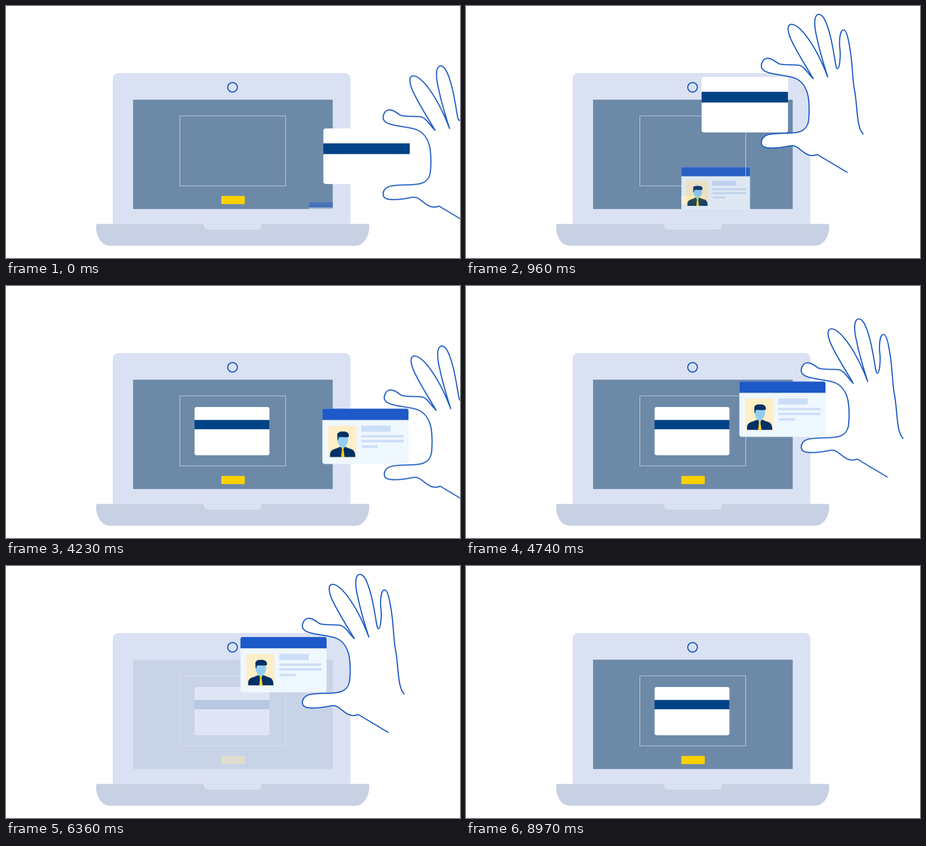
An HTML page without scripts that plays this animation: 1004x558 px, repeating every 9 s.

```html
<!DOCTYPE html>
<html lang="en">
<head>
<meta charset="utf-8">
<title>Card capture</title>
<style>
  html, body { margin: 0; width: 100%; height: 100%; overflow: hidden; background: #fff; }
  svg { display: block; width: 100%; height: 100%; }

  .hand { fill: #fff; stroke: #1f5cc6; stroke-width: 2.6; stroke-linecap: round; stroke-linejoin: round; }

  .first, .second, .stored { animation: 9s step-end infinite; }
  .first { animation-name: show-first; }
  .second { animation-name: show-second; }
  .stored { animation-name: show-stored; }
  @keyframes show-first {
    0% { visibility: visible; }
    44.2%, 100% { visibility: hidden; }
  }
  @keyframes show-second {
    0% { visibility: hidden; }
    46.84% { visibility: visible; }
    99.5%, 100% { visibility: hidden; }
  }
  @keyframes show-stored {
    0% { visibility: hidden; }
    46.84%, 100% { visibility: visible; }
  }

  /* the hand brings each card up to the camera */
  .reach-first { animation: reach-first 9s linear infinite; }
  .reach-second { animation: reach-second 9s linear infinite; }
  @keyframes reach-first {
    0% { transform: translate(181px, 114.3px); }
    10.667%, 100% { transform: translate(0, 0); }
  }
  @keyframes reach-second {
    0%, 47% { transform: translate(181.3px, 114.5px); }
    57.8%, 100% { transform: translate(0, 0); }
  }

  /* the camera view follows on a curve: x slows down, y speeds up */
  .view-x { animation: view-x 9s cubic-bezier(.33, .5, .67, .9) infinite; }
  .view-y { animation: view-y 9s cubic-bezier(.33, .05, .67, .36) infinite; }
  .view-size { animation: view-size 9s cubic-bezier(.33, 1, .67, 1) infinite; }
  .view-fade { animation: view-fade 9s cubic-bezier(.33, .5, .67, .9) infinite; }
  @keyframes view-x {
    0% { transform: translateX(713.5px); }
    17.333%, 100% { transform: translateX(502px); }
  }
  @keyframes view-y {
    0% { transform: translateY(463px); }
    17.333%, 100% { transform: translateY(321.7px); }
  }
  @keyframes view-size {
    0% { transform: scale(.46); }
    17.333%, 100% { transform: scale(.818); }
  }
  @keyframes view-fade {
    0% { opacity: .45; }
    17.333%, 100% { opacity: 1; }
  }

  .flash { animation: flash 9s ease-in-out infinite; }
  @keyframes flash {
    0%, 21%, 28.333%, 68%, 75.333%, 100% { opacity: 1; }
    24.667%, 71.667% { opacity: 0; }
  }
</style>
</head>
<body>
<svg viewBox="0 0 1004 558" preserveAspectRatio="none">
  <defs>
    <clipPath id="screen"><path d="M281 207.5H722.5V449.5H281Z"/></clipPath>

    <g id="stripe-card">
      <rect width="191" height="123" rx="5" fill="#fff"/>
      <rect y="33" width="191" height="23.7" fill="#004386"/>
    </g>

    <g id="id-card">
      <rect width="190.5" height="122.5" rx="5" fill="#eff7ff"/>
      <path d="M0 25V5Q0 0 5 0H185.500Q190.500 0 190.500 5V25Z" fill="#1d59c8"/>
      <rect x="13" y="37.500" width="62" height="69.500" fill="#ffeec6"/>
      <path d="M34 60H57V70Q56 79 51 82V89H39V82Q34 79 34 70Z" fill="#93cdf4"/>
      <path d="M17 107V102C17 92 24 90 31 88L39 84.500L45 88L51 84.500L59 88C67 90 73 92 73 107Z" fill="#003066"/>
      <path d="M42.500 87.500L45 85L47.500 87.500L46.800 91L49 107H41.500L43.300 91Z" fill="#ffd22a"/>
      <path d="M33.500 69.500L33 58C33 51 42 50 47 50.500C56 50.500 60 56 58.500 62C51 65 43 61 36 63.500L35 69.500Z" fill="#003066"/>
      <path d="M86 37.500h65v13.500h-65zM86 58.500h93.500v5h-93.500zM86 69.300h93.500v5h-93.500zM87.500 81.300h35v5.200h-35z" fill="#ccddf7"/>
    </g>

    <path id="hand" class="hand" d="M878 283C863 268 866 220 859 185C854 160 855 120 847 83
      C844 65 840 53 835 53C828 53 826 70 826 84C826 94 829 100 827 119C826 132 824 139 821 139
      C817 138 815 105 806 68C798 36 790 18 780 18.500C768 20 770 46 776 70C782 100 792 132 800 157
      C789 128 774 95 753 67C740 50 729 40 719 40.500C709 42 712 57 717 70C727 95 750 130 768 161
      C757 151 748 132 735 131C719 129 704 132 691 127.500C681 121 675 115 665 116
      C656 117 650 132 655 139C664 152 697 151 722 158C741 163 753 179 757 202
      C759 216 759.500 232 758 250C757 270 744 279 727 280.500C709 283 692 281 673 284
      C657 286 651 297 654 307C658 318 690 315 712 310.500C719 309 725 308 731 312
      C742 319 750 329 763 331C769 332 773 330 777 329L843 368.500"/>
  </defs>

  <rect x="236" y="148.500" width="525.500" height="350" rx="12" fill="#dae1f3"/>
  <path d="M199 486Q199 482.500 203 482.500H799.500Q803.500 482.500 803.500 486C803.500 513 789 531 772 531H230C212 531 199 513 199 486Z" fill="#c8d1e3"/>
  <path d="M435 482.500Q437 483 437.500 486Q439 495 446 495H557Q564 495 565 486Q565.500 483 567.500 482.500Z" fill="#dae1f3"/>
  <circle cx="501" cy="180" r="10.600" fill="none" stroke="#1f5cc6" stroke-width="2.500"/>

  <g class="flash" clip-path="url(#screen)">
    <rect x="281" y="207.500" width="441.500" height="242" fill="#6c89a8"/>
    <rect x="476" y="420.500" width="52" height="18.200" rx="2" fill="#ffd000"/>
    <g class="first">
      <g class="view-x"><g class="view-y"><g class="view-size"><g class="view-fade">
        <use href="#id-card" x="-95.250" y="-61.250"/>
      </g></g></g></g>
    </g>
    <g class="stored">
      <use href="#stripe-card" transform="translate(417 268) scale(.867)"/>
    </g>
    <rect x="384.500" y="243.300" width="234" height="155" fill="none" stroke="#d9e3f0"/>
  </g>

  <g class="first">
    <g class="reach-first">
      <use href="#stripe-card" x="521" y="157"/>
      <use href="#hand"/>
    </g>
  </g>
  <g class="second">
    <g class="reach-second">
      <use href="#id-card" x="518.500" y="157.300"/>
      <use href="#hand" x="2.300"/>
    </g>
  </g>
</svg>
</body>
</html>
```
